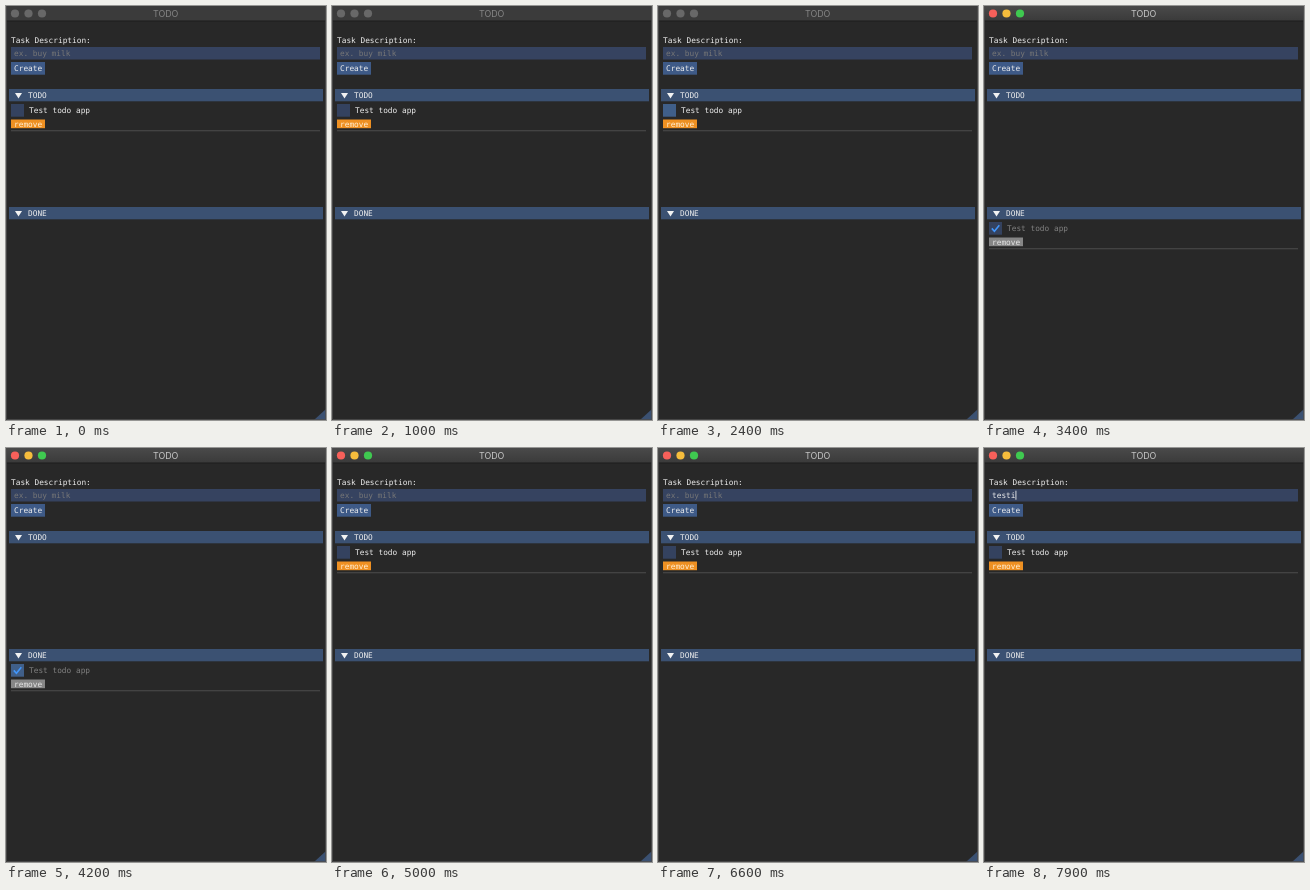
Animation of 320x414 px, one loop 8 s. Source, as an HTML page:

```html
<!DOCTYPE html>
<html>
<head>
<meta charset="utf-8">
<style>
html, body { margin: 0; width: 100%; height: 100%; overflow: hidden; background: #282828; }
svg { display: block; width: 320px; height: 414px; }
text { font: 7.8px "DejaVu Sans Mono", monospace; fill: #eee; white-space: pre; }
.title { font: 8.9px Inter, "Liberation Sans", sans-serif; text-anchor: middle; }
.bar { fill: #3b5172; }
.field { fill: #364360; }
.button { fill: #3e5a87; }
.dim { fill: #777; }
.rule { fill: #555; }
</style>
</head>
<body>
<svg viewBox="0 0 320 414">
  <defs>
    <linearGradient id="chrome" x2="0" y2="1">
      <stop stop-color="#4a4a4a"/><stop offset="1" stop-color="#3a3a3a"/>
    </linearGradient>
    <g id="arrow"><path d="M9 4H16L12.5 9.5Z" fill="#f2f2f2"/></g>
  </defs>
  <rect width="320" height="414" fill="#282828"/>
  <rect id="top" width="320" height="15"/>
  <rect y="14.5" width="320" height="1" fill="#1c1c1c"/>
  <circle class="light" cx="9" cy="7.5" r="4.1"/>
  <circle class="light" cx="22.5" cy="7.5" r="4.1"/>
  <circle class="light" cx="36" cy="7.5" r="4.1"/>
  <text id="title" class="title" x="159.7" y="10.8">TODO</text>

  <text x="5" y="37">Task Description:</text>
  <rect class="field" x="5" y="41" width="309" height="12.5"/>
  <text id="entry" x="8" y="50"></text>
  <rect id="caret" y="42.7" width="0.9" height="9" fill="#eee"/>
  <rect class="button" x="5" y="56" width="34" height="12.7"/>
  <text x="8" y="65.3">Create</text>

  <g transform="translate(0 83)">
    <rect class="bar" x="3" width="314" height="12.3"/>
    <use href="#arrow"/><text x="22" y="9.2">TODO</text>
  </g>
  <g transform="translate(0 201)">
    <rect class="bar" x="3" width="314" height="12.3"/>
    <use href="#arrow"/><text x="22" y="9.2">DONE</text>
  </g>

  <g id="task">
    <rect id="box" x="5" width="13" height="12.7"/>
    <path id="tick" d="M7.8 6.4L10.4 9.3L15.3 3.3" fill="none" stroke="#4296fa" stroke-width="1.6"/>
    <text id="label" x="23" y="9.2">Test todo app</text>
    <rect id="remove" x="5" y="15.5" width="34" height="8.7"/>
    <text id="removeText" x="8" y="22.6">remove</text>
    <rect class="rule" x="5" y="26.4" width="309" height="0.8"/>
  </g>

  <path d="M320 403V414H308Z" fill="#3b5172"/>
  <path d="M0.5 0V413.5H319.5V0" fill="none" stroke="#505050" stroke-width="0.8"/>
</svg>
<script>
const LOOP = 8000, ADVANCE = 4.696;
const $ = id => document.getElementById(id);
const lights = document.querySelectorAll('.light');
const lightColors = ['#f7605a', '#f6bd3c', '#3fc950'];
const within = (t, from, to) => t >= from && t < to;

const keys = [6900, 7100, 7300, 7500, 7800];
const word = 'testi';

function drawWindow(active) {
  $('top').setAttribute('fill', active ? 'url(#chrome)' : '#3b3b3b');
  $('title').style.fill = active ? '#c8c8c8' : '#868686';
  lights.forEach((c, i) => c.setAttribute('fill', active ? lightColors[i] : '#686868'));
}

function drawTask(done, hover) {
  $('task').setAttribute('transform', `translate(0 ${done ? 216 : 98})`);
  $('box').setAttribute('fill', hover ? '#405f89' : '#34425f');
  $('tick').setAttribute('visibility', done ? 'visible' : 'hidden');
  $('label').style.fill = done ? '#808080' : '#eee';
  $('remove').setAttribute('fill', done ? '#868686' : '#ee9022');
  $('removeText').style.fill = done ? '#e6e6e6' : '#fff0d8';
}

function drawEntry(t) {
  const typed = word.slice(0, keys.filter(k => t >= k).length);
  $('entry').textContent = typed || 'ex. buy milk';
  $('entry').setAttribute('class', typed ? '' : 'dim');
  $('caret').setAttribute('x', 8 + typed.length * ADVANCE);
  $('caret').setAttribute('visibility', typed || within(t, 5800, 6500) ? 'visible' : 'hidden');
}

function frame(now) {
  const t = now % LOOP;
  drawWindow(t >= 2700);
  drawTask(within(t, 3300, 4500), within(t, 2400, 3300) || within(t, 3900, 4500));
  drawEntry(t);
  requestAnimationFrame(frame);
}
frame(performance.now());
</script>
</body>
</html>
```
